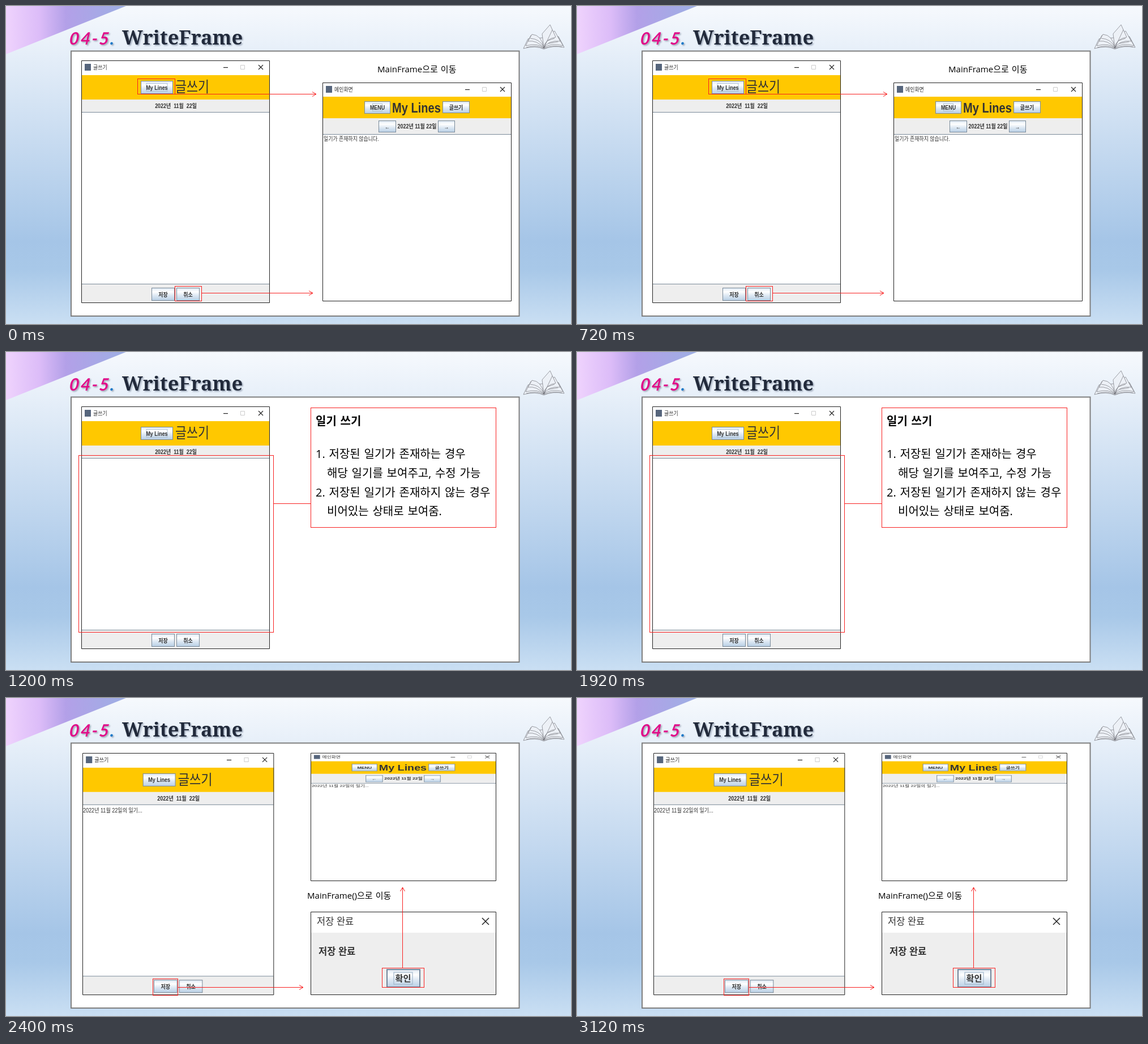
An HTML page for the animation above (3.6 s loop, 998x561 px).

```html
<!DOCTYPE html>
<html lang="ko">
<head>
<meta charset="utf-8">
<title>WriteFrame</title>
<style>
html, body { margin: 0; width: 100%; height: 100%; overflow: hidden; }
svg { display: block; width: 998px; height: 561px; }
text { white-space: pre; word-spacing: .08em; font-family: "Open Sans", "Noto Sans CJK KR", "Noto Sans CJK", sans-serif; }
.ui text { word-spacing: 0; font-family: "Liberation Sans", "Noto Sans CJK KR", "Noto Sans CJK", sans-serif; fill: #333; }
.mid { text-anchor: middle; }
.bold { font-weight: 700; }
.red { fill: none; stroke: #f82020; stroke-width: 1; }
.scene { animation: show 3600ms step-end infinite; }
.scene:nth-child(2) { animation-delay: -2400ms; }
.scene:nth-child(3) { animation-delay: -1200ms; }
@keyframes show {
  0% { visibility: visible; }
  33.3333%, 100% { visibility: hidden; }
}
</style>
</head>
<body>
<svg viewBox="0 0 998 561" xmlns="http://www.w3.org/2000/svg">
  <defs>
    <linearGradient id="sky" x2="0" y2="1">
      <stop offset="0" stop-color="#f6f9fd"/>
      <stop offset=".74" stop-color="#a5c5e7"/>
      <stop offset=".83" stop-color="#a8c8e8"/>
      <stop offset="1" stop-color="#cadff3"/>
    </linearGradient>
    <linearGradient id="corner">
      <stop offset="0" stop-color="#efd3fd"/>
      <stop offset=".28" stop-color="#dcbcf8"/>
      <stop offset=".5" stop-color="#b3a0e8"/>
      <stop offset="1" stop-color="#9dafe4"/>
    </linearGradient>
    <linearGradient id="metal" x2="0" y2="1">
      <stop offset="0" stop-color="#dde8f3"/>
      <stop offset=".3" stop-color="#fff"/>
      <stop offset=".6" stop-color="#dde8f3"/>
      <stop offset="1" stop-color="#b8cfe5"/>
    </linearGradient>
    <filter id="shade" x="-5%" y="-20%" width="110%" height="150%">
      <feDropShadow dx="1.8" dy="1.8" stdDeviation="1" flood-color="#3c4a66" flood-opacity=".45"/>
    </filter>
  </defs>

  <rect width="998" height="561" fill="url(#sky)"/>
  <path d="M0 0H212L0 85Z" fill="url(#corner)"/>

  <g filter="url(#shade)">
    <text transform="translate(111 68) skewX(-6)" style="font:italic 700 30px Lato,sans-serif;letter-spacing:2.5px" fill="#e0108a">04-5<tspan fill="#1878c8">.</tspan></text>
    <text x="205" y="68" style="font:700 34.4px 'Noto Serif',serif" fill="#212b3b">WriteFrame</text>
  </g>

  <g fill="#edf1f7" stroke="#55555c" stroke-width=".55" stroke-linejoin="round">
    <path d="M922 58L914 75Q936 69 950 76Q966 69 986 73L976 54Z"/>
    <path d="M950 74Q940 65 918 70L927 52Q944 53 950 74Z"/>
    <path d="M950 74Q938 60 922 62L929 50Q946 51 950 74Z"/>
    <path d="M950 74Q962 64 984 70L974 53Q958 56 950 74Z"/>
    <path d="M950 74Q958 60 979 62L969 44Q956 50 950 74Z"/>
    <path d="M950 74Q952 58 971 55L961 33L947 49Z"/>
    <path d="M950 74L965 42M926 57Q942 58 949 71M919 73Q938 68 950 75Q964 68 982 72M958 66L975 63M957 61L969 57" fill="none"/>
  </g>

  <rect x="115" y="79.5" width="791.5" height="467.5" fill="#fff" stroke="#7f7f7f" stroke-width="2"/>
  <g id="stage"></g>
</svg>

<script>
const SQUEEZE = .85; // screenshots are narrower than tall
const TITLE = 'My Lines', WRITE = '글쓰기', DATE = '2022년 11월 22일';
const ENTRY = DATE + '의 일기...';

const rect = (x, y, w, h, fill, extra = '') =>
  `<rect x="${x}" y="${y}" width="${w}" height="${h}" fill="${fill}" ${extra}/>`;
const line = (d, color, width = 1) =>
  `<path d="${d}" fill="none" stroke="${color}" stroke-width="${width}"/>`;
const text = (x, y, size, str, cls = '') =>
  `<text x="${x}" y="${y}" font-size="${size}" class="${cls}">${str}</text>`;
const label = (x, y, str, cls = '', size = 10.5) =>
  `<text transform="translate(${x} ${y}) scale(${SQUEEZE} 1)" font-size="${size}" class="${cls}">${str}</text>`;
const scene = (...parts) => `<g class="scene">${parts.join('')}</g>`;

const redBox = (x, y, x2, y2) =>
  `<rect class="red" x="${x + .5}" y="${y + .5}" width="${x2 - x - 1}" height="${y2 - y - 1}"/>`;
const redLine = d => `<path class="red" d="${d}"/>`;
const arrowRight = (x, x2, y) =>
  redLine(`M${x} ${y + .5}H${x2}m-7 -4l7 4l-7 4`);
const arrowUp = (x, y, y2) =>
  redLine(`M${x + .5} ${y}V${y2}m-4 7l4 -7l4 7`);

function button(x, y, w, h, str, focus) {
  const half = str.length * 2.5;
  return rect(x + .5, y + .5, w - 1, h - 1, 'url(#metal)', 'stroke="#7a8a99"') +
    (focus ? rect(x + w / 2 - half + 1.5, y + 4.5, half * 2 - 3, h - 9, 'none', 'stroke="#a3b8cc" stroke-width=".8"') : '') +
    label(x + w / 2, y + h / 2 + 4, str, 'mid bold');
}

function frame(w, h, title) {
  return rect(0, 0, w, h, '#fff') +
    rect(6, 6, 11, 12, '#56657c') +
    label(21, 16, title) +
    line(`M${w - 82} 12.5h8`, '#222', 1.2) +
    line(`M${w - 51.5} 8.5h7v7h-7z`, '#ccc') +
    line(`M${w - 20} 8l8 8m0 -8l-8 8`, '#222', 1.1);
}

const border = (w, h) => rect(.5, .5, w - 1, h - 1, 'none', 'stroke="#222" vector-effect="non-scaling-stroke"');
const place = (x, y, sx, sy, body) =>
  `<g class="ui" transform="translate(${x} ${y}) scale(${sx} ${sy})">${body}</g>`;

function writeWindow(x, y, sx, sy, entry, focus) {
  const w = 333, h = 428;
  return place(x, y, sx, sy,
    frame(w, h, WRITE) +
    rect(0, 26, w, 43, '#ffc800') +
    button(105, 36, 57, 23, TITLE, focus) +
    label(166, 56, WRITE, '', 25.6) +
    rect(0, 69, w, 23, '#eee') +
    label(167, 84, '2022년  11월  22일', 'mid bold') +
    line('M1 91.5H332', '#7a8a99') +
    label(1, 105, entry) +
    rect(0, 395, w, 33, '#eee') +
    line('M1 394.5H332', '#7a8a99') +
    button(124, 401, 41, 23, '저장') +
    button(168, 401, 41, 23, '취소') +
    border(w, h));
}

function mainWindow(x, y, sx, sy, entry, focus) {
  const w = 334, h = 386;
  return place(x, y, sx, sy,
    frame(w, h, '메인화면') +
    rect(0, 25, w, 38, '#ffc800') +
    button(74, 33, 46, 22, 'MENU', focus) +
    label(123, 53, TITLE, 'bold', 23.6) +
    button(212, 33, 48, 21, WRITE) +
    rect(0, 63, w, 29, '#eee') +
    button(99, 67, 31, 21, '←') +
    label(167, 81, DATE, 'mid bold') +
    button(204, 67, 30, 21, '→') +
    line('M1 91.5H333', '#7a8a99') +
    label(2, 103, entry) +
    border(w, h));
}

const dialog = place(538, 377, 1, 1,
  rect(0, 0, 328, 147, '#fff') +
  rect(0, 37, 328, 110, '#eee') +
  text(11, 23, 16.5, '저장 완료') +
  text(14, 76, 16.5, '저장 완료', 'bold') +
  line('M303 11l12 12m0 -12l-12 12', '#222', 1.5) +
  rect(135, 102, 58, 31, 'url(#metal)', 'stroke="#72859a" stroke-width="2"') +
  rect(147, 107, 33, 21, 'none', 'stroke="#a3b8cc" stroke-width="1.2"') +
  text(163.5, 123, 15.2, '확인', 'mid bold') +
  border(328, 147));

const notes = [
  [547, 187, '1. 저장된 일기가 존재하는 경우'],
  [567, 221, '해당 일기를 보여주고, 수정 가능'],
  [547, 255, '2. 저장된 일기가 존재하지 않는 경우'],
  [567, 288, '비어있는 상태로 보여줌.']
].map(([x, y, str]) => text(x, y, 20, str)).join('');

document.getElementById('stage').innerHTML =
  scene(
    writeWindow(133, 96, 1, 1, '', true),
    mainWindow(559, 135, 1, 1, '일기가 존재하지 않습니다.', true),
    text(656, 117, 15, 'MainFrame으로 이동'),
    redBox(232, 128, 299, 156), arrowRight(299, 548, 155),
    redBox(298, 494, 346, 521), arrowRight(346, 542, 506)
  ) +
  scene(
    writeWindow(133, 96, 1, 1, '', true),
    redBox(128, 182, 473, 495), redLine('M473 267.5H538'), redBox(538, 98, 866, 310),
    text(547, 129, 20, '일기 쓰기', 'bold'), notes
  ) +
  scene(
    writeWindow(135, 97, 1.016, .998, ENTRY, false),
    mainWindow(538, 97, .982, .585, ENTRY, false),
    text(532, 354, 15, 'MainFrame()으로 이동'),
    dialog,
    redBox(259, 495, 304, 525), arrowRight(304, 525, 510),
    redBox(664, 476, 739, 511), arrowUp(700, 476, 334)
  );
</script>
</body>
</html>
```
